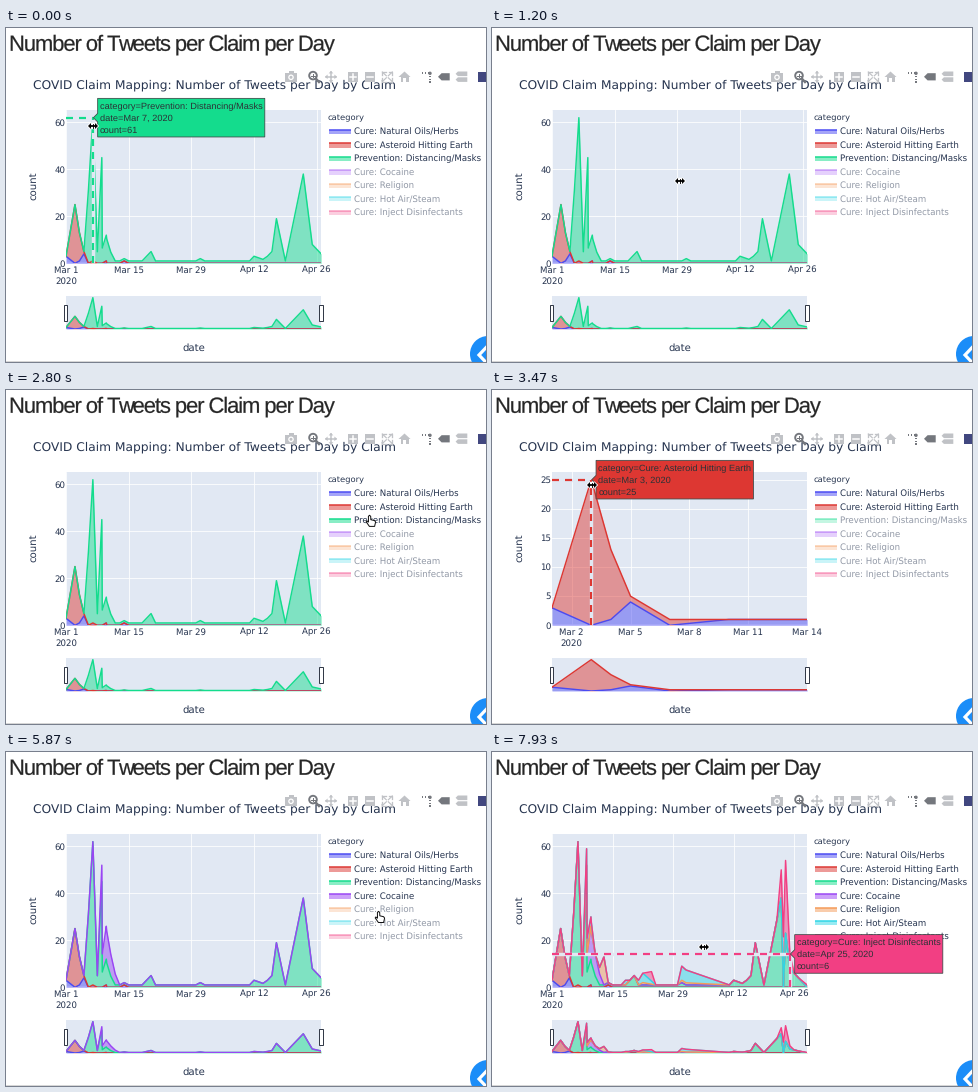
Recreate the animation shown at these times as a matplotlib script. Size 480 by 334 pixels, loop 8 s.

```python
import matplotlib
import matplotlib.pyplot as plt
import numpy as np
from matplotlib.animation import FuncAnimation
from matplotlib.patches import Circle, PathPatch, Polygon
from matplotlib.path import Path
from matplotlib.textpath import TextPath

matplotlib.rcParams["text.hinting"] = "none"

W, H, DPI = 480, 334, 100
PT = 72 / DPI                      # points per pixel
STEP, FRAMES = 50, 160

LEFT, RIGHT, TOP, BASE = 60, 315.2, 82, 235.3
MINI_TOP, MINI_BASE = 268, 301
INK, PANEL = "#26344f", "#e1e8f3"

COLORS = dict(oils="#4a4af2", asteroid="#dd3732", masks="#14dc8d",
              cocaine="#9a45f4", religion="#f59a58", steam="#2fd6e6",
              inject="#f23f83")
LABELS = dict(oils="Cure: Natural Oils/Herbs",
              asteroid="Cure: Asteroid Hitting Earth",
              masks="Prevention: Distancing/Masks",
              cocaine="Cure: Cocaine", religion="Cure: Religion",
              steam="Cure: Hot Air/Steam", inject="Cure: Inject Disinfectants")

# Days count from Mar 1; fractions are second reports of the same day.
DAYS = [*range(5, 58), 8.1, 9.1]


def bursts(*tents, level=0, extra=()):
    """Daily counts as a sum of (day, height, rise, fall) triangles."""
    def count(d):
        return level + sum(
            h * max(0, 1 - ((c - d) / rise if d < c else (d - c) / fall))
            for c, h, rise, fall in tents)
    return {d: count(d) for d in [*DAYS, *extra]}


DATA = dict(
    oils={0: 3, 2: 0, 3: 1, 4: 4, 6: 0, 9: 1, 13: 1},
    asteroid={2: 25, 3: 12, 4: 1, 6: 1},
    masks=bursts((6, 60, 2, 1.07), (8, 39, 1, 0.1), (9, 10, 2, 1.6),
                 (19, 4, 2, 1), (30, 1, 1, 1), (42, 2, 1, 3), (47, 12, 1, 2),
                 (47, 6, 3, 2), (53, 37, 4, 2), (55, 7, 2, 3.5), level=1),
    cocaine=bursts((9, 14, 2, 3)),
    religion=bursts((12, 12, 1.3, 1), (21, 1, 1, 3), (30, 1, 1, 11)),
    steam=bursts((8, 7, 1, 1), (9, 4, 1, 1), (17, 2, 1, 1), (21, 4, 2, 3),
                 (30, 6, 1, 11)),
    inject=bursts((23, 4, 2, 1), (53, 12, 1, 1), (54, 31, 1, 1.25),
                  (59, 1, 2, 1), extra=(53.5, 59)),
)
ORDER = list(DATA)


def row_y(i):
    return 103.3 + 13.45 * i


# Legend clicks come at an even pace, row after row.
MASKS_OFF = 3000
TURN_ON = {n: 5140 + 560 * k for k, n in enumerate(ORDER[2:])}

# Start and end in ms, then where the cursor goes.
START = (87, 98)
MOVES = [(130, 520, 205, 224), (520, 730, 188, 153), (1200, 1500, 100, 132),
         (1600, 1930, 163, 188), (2420, 2760, 365, 131),
         (2930, 3070, 335, 118), (3130, 3430, 100, 95), (4000, 4700, 365, 134)]
MOVES += [(TURN_ON[n], TURN_ON[n] + 110, 374, row_y(i + 1) + 8)
          for i, n in enumerate(ORDER[:-1]) if i >= 2]
MOVES += [(7430, 7890, 212, 195)]

# Start, end, trace and day of each hover label.
HOVERS = [(0, 140, "masks", 6), (280, 420, "masks", 19),
          (420, 640, "masks", 33), (1340, 1620, "masks", 8),
          (2270, 2650, "masks", 53), (3340, 4080, "asteroid", 2),
          (7640, 8000, "inject", 55)]


def shown(t):
    return tuple(n for n in ORDER if t >= TURN_ON.get(n, 0)
                 or (n == "masks" and t < MASKS_OFF))


fig = plt.figure(figsize=(W / DPI, H / DPI), dpi=DPI, facecolor="white")
ax = fig.add_axes([0, 0, 1, 1])
ax.set_xlim(0, W)
ax.set_ylim(H, 0)
ax.axis("off")


def line(xs, ys, color, width=1.0, z=1, **kw):
    return ax.plot(xs, ys, color=color, lw=width * PT, zorder=z, **kw)[0]


def poly(points, color, z=1, edge="none", width=0, **kw):
    return ax.add_patch(Polygon(points, closed=True, fc=color, ec=edge,
                                lw=width * PT, zorder=z, **kw))


def box(x0, y0, x1, y1, color, z=1, **kw):
    return poly([(x0, y0), (x1, y0), (x1, y1), (x0, y1)], color, z, **kw)


def disc(x, y, r, color, z=1, **kw):
    return ax.add_patch(Circle((x, y), r, fc=color, zorder=z, **kw))


def write(x, y, s, size=8.7, color=INK, z=1, ha="left", va="baseline",
          font="DejaVu Sans", **kw):
    return ax.text(x, y, s, fontsize=size * PT, color=color, zorder=z, ha=ha,
                   va=va, family=font, **kw)


def advance(s, size, font="Liberation Sans"):
    """Pen advance of a string in pixels."""
    def end(u):
        return TextPath((0, 0), u, size=size,
                        prop={"family": font}).get_extents().x1
    return end(s + "|") - end("|")


def spaced_text(x, y, s, size, gap, color):
    parts = []
    for i, ch in enumerate(s):
        if ch != " ":
            pos = advance(s[:i], size) + i * gap
            parts.append(TextPath((pos, 0), ch, size=size,
                                  prop={"family": "Liberation Sans"}))
    path = Path.make_compound_path(*parts)
    verts = path.vertices * [1, -1] + [x, y]
    ax.add_patch(PathPatch(Path(verts, path.codes), fc=color, ec=color,
                           lw=0.2 * PT))


def draw_modebar():
    grey, dark, z, mid = "#c0c2c6", "#74777d", 3, 48.8
    # camera
    box(279, 45, 291, 54, grey, z)
    box(283, 43, 288, 46, grey, z)
    disc(285, 49.3, 2.8, "white", z)
    disc(285, 49.3, 1.5, grey, z)
    # magnifier
    disc(307, 47.6, 3.8, "none", z, ec=dark, lw=1.9 * PT)
    line([310, 313], [50.8, 54], dark, 2.4, z)
    line([305.4, 308.6], [47.6, 47.6], dark, 1, z)
    line([307, 307], [46, 49.2], dark, 1, z)
    # pan
    for dx, dy in ((1, 0), (-1, 0), (0, 1), (0, -1)):
        tip = np.array([325 + 6 * dx, mid + 6 * dy])
        back, side = np.array([dx, dy]) * 2.6, np.array([dy, dx]) * 2.3
        line([325, 325 + 5 * dx], [mid, mid + 5 * dy], grey, 1.5, z)
        poly([tip, tip - back + side, tip - back - side], grey, z)
    # zoom in, zoom out
    for x in (347, 364):
        box(x - 5.2, mid - 5.2, x + 5.2, mid + 5.2, grey, z)
        line([x - 3, x + 3], [mid, mid], "white", 1.5, z)
    line([347, 347], [mid - 3, mid + 3], "white", 1.5, z)
    # autoscale
    for sx in (-1, 1):
        for sy in (-1, 1):
            x, y = 381.3 + 5 * sx, mid + 4.8 * sy
            line([x - 3.2 * sx, x, x], [y, y, y - 3.2 * sy], grey, 1.3, z)
            line([381.3 + sx, x], [mid + sy, y], grey, 1.2, z)
    # home
    poly([(392.5, 49), (398.5, 43.5), (404.5, 49)], grey, z)
    box(394.5, 48.5, 402.5, 50.2, grey, z)
    for x in (394.5, 399.6):
        box(x, 48.5, x + 2.9, 53.6, grey, z)
    # spike lines
    for k in range(3):
        box(415.5 + 3 * k, 44.4, 417.2 + 3 * k, 46.1, dark, z)
        box(423.2, 47.8 + 2.7 * k, 424.9, 49.3 + 2.7 * k, dark, z)
    disc(424, 45.3, 1.7, dark, z)
    # hover modes
    for x, y, r, color in ((432, mid, 3.6, dark), (449.6, 45.8, 2.3, grey),
                           (449.6, 51.6, 2.3, grey)):
        poly([(x, y), (x + r, y - r), (x + 11.7, y - r), (x + 11.7, y + r),
              (x + r, y + r)], color, z)
    box(472, 43.5, 480, 54, "#41477f", z)


def draw_page():
    spaced_text(3, 22.8, "Number of Tweets per Claim per Day", 22, -1.08,
                "#262626")
    write(27, 60.1, "COVID Claim Mapping: Number of Tweets per Day by Claim",
          12.28)
    write(28, 158, "count", 10.1, ha="center", va="center", rotation=90)
    write(188, 323.3, "date", 10.1, ha="center")
    write(321.5, 92.7, "category", 8.4)
    line([0, W], [333.4, 333.4], "#d2d2d2", 0.9)
    draw_modebar()
    disc(482, 326, 18, "#1b8df8", 3)
    line([482, 473, 482], [317.5, 327, 336.5], "white", 3.2, 4,
         solid_joinstyle="miter")


class Chart:
    """Stacked areas, axes and legend for one choice of visible traces."""

    def __init__(self, names):
        self.names = names
        self.days = sorted(set().union(*(DATA[n] for n in names)))
        rows = [[DATA[n].get(d, 0) for d in self.days] for n in names]
        self.stack = np.cumsum(rows, axis=0)
        self.peak = self.stack.max()
        before = set(ax.get_children())
        self.draw()
        self.parts = [a for a in ax.get_children() if a not in before]
        self.show(False)

    def show(self, on):
        for a in self.parts:
            a.set_visible(on)

    def x(self, day):
        return LEFT + np.asarray(day) / self.days[-1] * (RIGHT - LEFT)

    def y(self, v, top=TOP, base=BASE):
        return base - np.asarray(v) * 0.95 / self.peak * (base - top)

    def point(self, name, day):
        row, col = self.names.index(name), self.days.index(day)
        return float(self.x(day)), float(self.y(self.stack[row, col]))

    def areas(self, top, base, panel):
        xs = self.x(self.days)
        floor = np.full(len(xs), float(base))
        tops = [self.y(row, top, base) for row in self.stack]
        for n, ys in zip(self.names, tops):
            ax.fill_between(xs, floor, ys, color=COLORS[n], alpha=0.48, lw=0,
                            zorder=1)
            floor = ys
        for n, ys in zip(self.names, tops):
            line(xs, ys, COLORS[n], 1.45).set_clip_path(panel)

    def draw(self):
        short = self.days[-1] < 20
        panel = box(LEFT, TOP, RIGHT, BASE, PANEL)
        mini = box(LEFT, MINI_TOP, RIGHT, MINI_BASE, PANEL)
        for i, day in enumerate(range(1, 14, 3) if short
                                else range(0, 57, 14)):
            x = float(self.x(day))
            line([x, x], [TOP, BASE], "white", 0.8)
            write(x, 244.6, date_name(day), ha="center")
            if i == 0:
                write(x, 255.8, "2020", ha="center")
        for v in range(0, int(self.peak) + 1, 5 if short else 20):
            y = float(self.y(v))
            line([LEFT, RIGHT], [y, y], "white", 0.8 if v else 1.5)
            write(59.3, y + 3.2, str(v), ha="right")
        self.areas(TOP, BASE, panel)
        self.areas(MINI_TOP, MINI_BASE, mini)
        for x in (LEFT - 0.4, RIGHT - 0.1):
            box(x - 1.8, 277, x + 1.8, 293, "white", edge="#333a48", width=1)
        for i, n in enumerate(ORDER):
            y = row_y(i)
            dim = 1 if n in self.names else 0.5
            box(323.3, y - 1.5, 345.3, y + 2.9, COLORS[n], alpha=0.5 * dim)
            line([323.3, 345.3], [y - 1.5, y - 1.5], COLORS[n], 1.5,
                 alpha=dim, solid_capstyle="butt")
            write(348, y + 3.2, LABELS[n], alpha=dim)


def date_name(day):
    return f"Mar {day + 1}" if day < 31 else f"Apr {day - 30}"


def hover_label(chart, name, day):
    x, y = chart.point(name, day)
    color, z = COLORS[name], 5
    for xs, ys in (([LEFT, x], [y, y]), ([x, x], [BASE, y])):
        line(xs, ys, PANEL, 3.4, z, solid_capstyle="butt")
        spike = line(xs, ys, color, 2.2, z, dash_capstyle="butt")
        spike.set_dashes((7 / 2.2, 6 / 2.2))
    rows = [f"category={LABELS[name]}", f"date={date_name(day)}, 2020",
            f"count={round(DATA[name][day])}"]
    x0 = x + 4.8
    x1 = x0 + advance(rows[0], 9.25) + 4.4
    poly([(x + 0.5, y), (x0, y - 4.3), (x0, y - 19.3), (x1, y - 19.3),
          (x1, y + 19.3), (x0, y + 19.3), (x0, y + 4.3)], color, z,
         edge="#3c4a48", width=0.8)
    for i, row in enumerate(rows):
        write(x0 + 2.2, y - 9 + 12 * i, row, 9.25, "#2c3236", z,
              font="Liberation Sans")


ARROW = np.array([(-5, 0), (-2, -3), (-2, -0.9), (2, -0.9), (2, -3), (5, 0),
                  (2, 3), (2, 0.9), (-2, 0.9), (-2, 3)])
HAND = np.array([(-2.6, -4.6), (-1.5, -5.8), (-0.3, -4.6), (-0.2, -1.3),
                 (3.6, -0.4), (4.6, 1), (3.6, 5.4), (-1.6, 5.4), (-4.8, 0.8),
                 (-4.2, -0.2), (-2.5, 1.2)])


def cursor_at(t):
    pos = np.array(START, float)
    for start, end, x, y in MOVES:
        u = np.clip((t - start) / (end - start), 0, 1)
        pos += (np.array([x, y]) - pos) * u * u * (3 - 2 * u)
    return pos


def draw_cursor(t):
    pos = cursor_at(t)
    if pos[0] > 318:
        poly(HAND + pos, "white", 7, edge="#111111", width=1)
        return
    x, y = pos
    poly(ARROW + pos, "white", 7, edge="white", width=1.6)
    line([x, x], [y - 2.4, y + 2.4], "white", 2.4, 7)
    poly(ARROW + pos, "black", 7)
    line([x, x], [y - 2, y + 2], "black", 0.9, 7)


draw_page()
charts = {}
for i in range(FRAMES):
    names = shown(i * STEP)
    if names not in charts:
        charts[names] = Chart(names)
overlay = []


def update(i):
    t = i * STEP
    while overlay:
        overlay.pop().remove()
    for names, chart in charts.items():
        chart.show(names == shown(t))
    before = set(ax.get_children())
    for start, end, name, day in HOVERS:
        if start <= t < end:
            hover_label(charts[shown(t)], name, day)
    draw_cursor(t)
    overlay.extend(a for a in ax.get_children() if a not in before)
    return []


anim = FuncAnimation(fig, update, frames=FRAMES, interval=STEP, repeat=True,
                     repeat_delay=0, blit=False)
plt.show()
```
